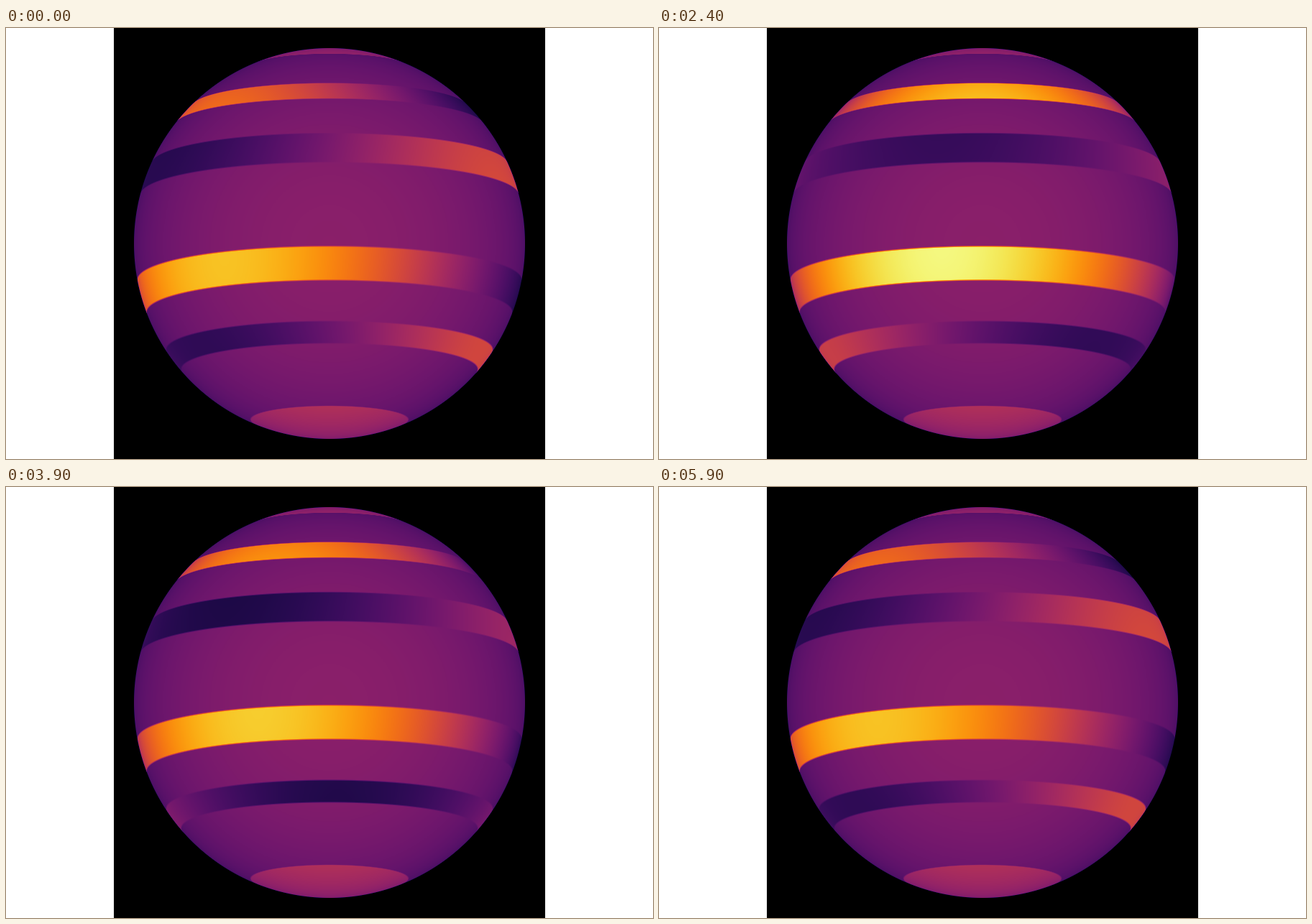
Recreate the animation shown at these times as an HTML page with a canvas. Size 900 by 600 pixels, loop 6000 ms.

```html
<!DOCTYPE html>
<html lang="en">
<head>
<meta charset="utf-8">
<title>Banded sphere</title>
<style>
  html, body { margin: 0; width: 100%; height: 100%; overflow: hidden; background: #fff; }
  canvas { position: absolute; left: 150px; top: 0; width: 600px; height: 600px; }
</style>
</head>
<body>
<canvas id="globe" width="600" height="600"></canvas>
<script>
const SIZE = 600, R = 272, RAD = Math.PI / 180;
const TILT = 10 * RAD, LIMB = 0.42;
const BASE = 0.375, CAP = 0.58, CAP_LAT = 66.2, SOFT = 0.5;
const STEP = 100, STEPS = 60;

// Latitude range, longitude of the crest at the start, turns per loop
const BANDS = [
  { lo: 37.9, hi: 45.2, crest: -88, turns: -24 },
  { lo: 14.6, hi: 24.4, crest: 126, turns: -12 },
  { lo: -20.8, hi: -10.8, crest: -67, turns: -12 },
  { lo: -40.7, hi: -33.4, crest: 134, turns: -24 }
];

// Polynomial fit of the inferno colour scale, one row per channel
const INFERNO = [
  [0.00022, 0.10651, 11.60249, -41.704, 77.16294, -71.31943, 25.13112],
  [0.00165, 0.56396, -3.97285, 17.4364, -33.40236, 32.62606, -12.24267],
  [-0.01948, 3.93271, -15.94239, 44.35415, -81.80731, 73.20952, -23.07033]
];

const clamp = v => Math.min(1, Math.max(0, v));
const mix = (a, b, k) => a + (b - a) * k;
const within = (lat, lo, hi) => clamp((lat - lo) / SOFT + 0.5) * clamp((hi - lat) / SOFT + 0.5);

const palette = Array.from({ length: 1024 }, (_, i) =>
  INFERNO.map(c => Math.round(255 * clamp(c.reduceRight((sum, k) => sum * i / 1023 + k, 0)))));

const ctx = document.getElementById('globe').getContext('2d');
const image = ctx.createImageData(SIZE, SIZE);
const bandPixels = [];

function plot(at, value) {
  const [r, g, b] = palette[Math.round(clamp(value) * 1023)];
  const d = image.data, i = at * 4;
  d[i] = r; d[i + 1] = g; d[i + 2] = b; d[i + 3] = 255;
}

function build() {
  const c = Math.cos(TILT), s = Math.sin(TILT);
  for (let py = 0; py < SIZE; py++) {
    for (let px = 0; px < SIZE; px++) {
      const at = py * SIZE + px;
      const x = (px + 0.5 - SIZE / 2) / R, y = (SIZE / 2 - py - 0.5) / R;
      const r = Math.hypot(x, y);
      const cover = clamp((1 - r) * R + 0.5);
      if (!cover) { plot(at, 0); continue; }

      const z = Math.sqrt(Math.max(0, 1 - r * r));
      const lat = Math.asin(Math.max(-1, Math.min(1, y * c - z * s))) / RAD;
      const lon = Math.atan2(x, y * s + z * c);
      const light = cover * (1 - LIMB * (1 - z));
      const cap = clamp((Math.abs(lat) - CAP_LAT) / SOFT + 0.5);
      plot(at, light * mix(BASE, CAP, cap));

      BANDS.forEach((band, id) => {
        const weight = within(lat, band.lo, band.hi);
        if (weight) bandPixels.push({ at, id, weight, light, sin: Math.sin(lon), cos: Math.cos(lon) });
      });
    }
  }
}

function draw(step) {
  const part = step / (STEPS - 1), turn = 2 * Math.PI;
  const mean = 0.575 + 0.045 * Math.cos(turn * (part - 0.2)), swing = 0.4;
  const crests = BANDS.map(b => {
    const a = b.crest * RAD + turn * b.turns * part;
    return [swing * Math.cos(a), swing * Math.sin(a)];
  });
  for (const p of bandPixels) {
    const [a, b] = crests[p.id];
    const wave = mean + a * p.cos + b * p.sin;
    plot(p.at, p.light * mix(BASE, wave, p.weight));
  }
  ctx.putImageData(image, 0, 0);
}

let shown = -1;
const start = performance.now();
function tick() {
  const step = Math.floor((performance.now() - start) / STEP) % STEPS;
  if (step !== shown) draw(shown = step);
  requestAnimationFrame(tick);
}

build();
draw(shown = 0);
requestAnimationFrame(tick);
</script>
</body>
</html>
```
